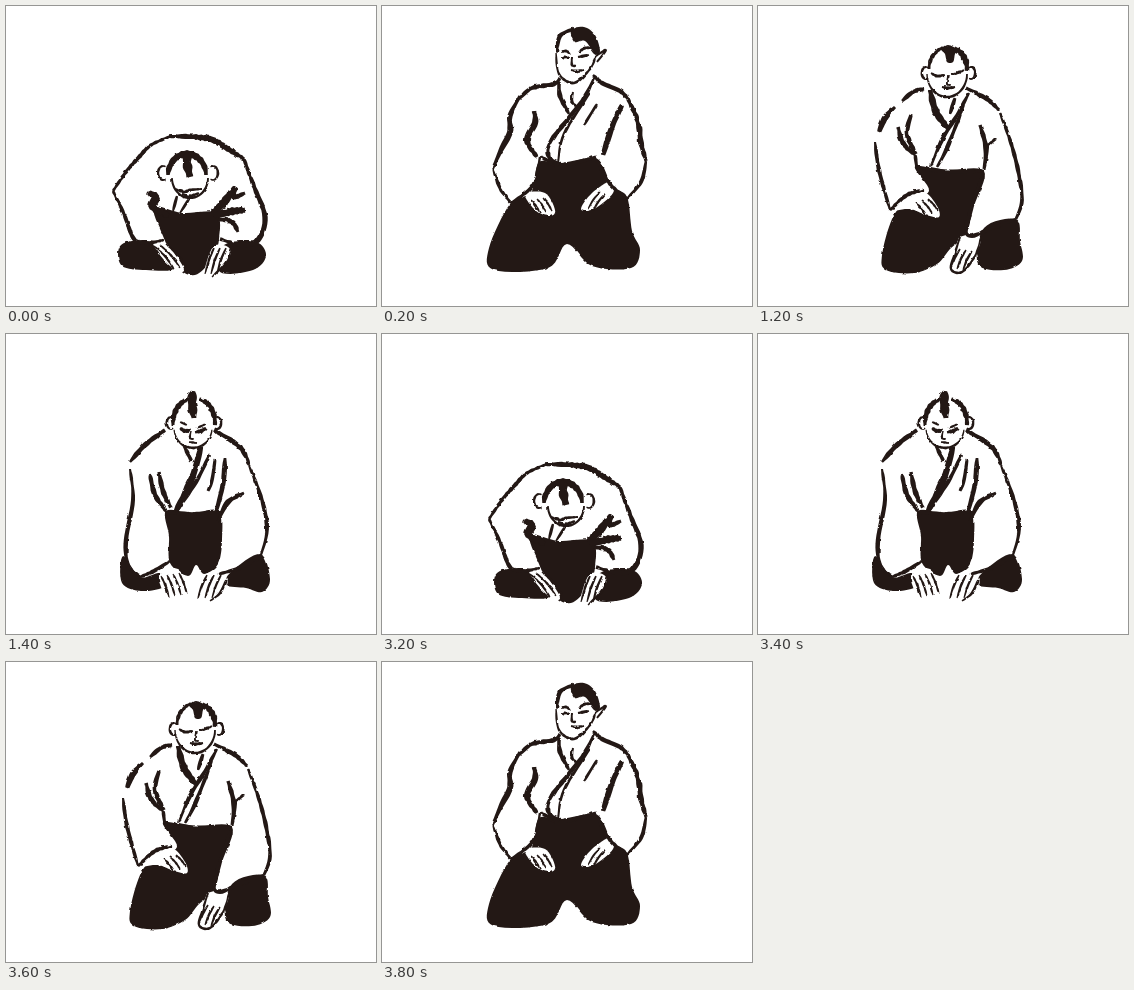
An HTML page that plays this animation: 370x300 px, repeating every 4 s.

```html
<!DOCTYPE html>
<html lang="en">
<head>
<meta charset="utf-8">
<title>Bow</title>
<style>
html, body { margin: 0; width: 100%; height: 100%; overflow: hidden; background: #fff; }
svg { display: block; width: 370px; height: 300px; }
g { visibility: hidden; animation: 4s step-end infinite; }
#sit { animation-name: sit; }
#nod { animation-name: nod; }
#lean { animation-name: lean; }
#low { animation-name: low; }
#bow { animation-name: bow; }
@keyframes sit { 0%, 30% { visibility: hidden } 5%, 95%, 100% { visibility: visible } }
@keyframes nod { 0%, 35%, 95%, 100% { visibility: hidden } 30%, 90% { visibility: visible } }
@keyframes lean { 0%, 40%, 90%, 100% { visibility: hidden } 35%, 85% { visibility: visible } }
@keyframes low { 0%, 40%, 80% { visibility: visible } 5%, 45%, 85%, 100% { visibility: hidden } }
@keyframes bow { 0%, 80%, 100% { visibility: hidden } 45% { visibility: visible } }
</style>
</head>
<body>
<svg viewBox="0 0 370 300">
  <defs>
    <filter id="rough" filterUnits="userSpaceOnUse" x="0" y="0" width="370" height="300" color-interpolation-filters="sRGB">
      <feTurbulence type="fractalNoise" baseFrequency=".16" numOctaves="2" seed="4"/>
      <feDisplacementMap in="SourceGraphic" scale="2.6" xChannelSelector="R" yChannelSelector="G"/>
    </filter>
  </defs>
  <g id="sit" filter="url(#rough)"></g>
  <g id="nod" filter="url(#rough)"></g>
  <g id="lean" filter="url(#rough)"></g>
  <g id="low" filter="url(#rough)"></g>
  <g id="bow" filter="url(#rough)"></g>
</svg>
<script>
const INK = '#231815', PAPER = '#fff';
let layer;

const pose = id => { layer = document.getElementById(id); };
const parse = s => s.split(' ').map(p => p.split(',').map(Number));

function add(pts, color) {
  const path = document.createElementNS('http://www.w3.org/2000/svg', 'path');
  path.setAttribute('d', 'M' + pts.map(p => p.map(v => v.toFixed(1))).join('L') + 'Z');
  path.setAttribute('fill', color);
  layer.append(path);
}

// Catmull-Rom curve through the key points
function spline(pts, closed) {
  const n = pts.length, out = [], steps = 8;
  const at = i => closed ? pts[(i + n) % n] : pts[Math.max(0, Math.min(n - 1, i))];
  for (let i = 0; i < (closed ? n : n - 1); i++) {
    const [a, b, c, d] = [-1, 0, 1, 2].map(k => at(i + k));
    for (let s = 0; s < steps; s++) {
      const t = s / steps;
      out.push(b.map((v, k) => v + .5 * t * (c[k] - a[k] + t * (2 * a[k] - 5 * v + 4 * c[k] - d[k]
        + t * (3 * (v - c[k]) + d[k] - a[k])))));
    }
  }
  if (!closed) out.push(pts[n - 1]);
  return out;
}

const blob = (s, color = INK) => add(spline(parse(s), true), color);

// A stroke that swells in the middle, with a slight uneven pressure
function stroke(w, pts) {
  const left = [], right = [], last = pts.length - 1;
  pts.forEach(([x, y], i) => {
    const a = pts[Math.max(0, i - 1)], b = pts[Math.min(last, i + 1)];
    const dx = b[0] - a[0], dy = b[1] - a[1];
    const press = .6 + .4 * Math.sin(Math.PI * i / last) + .12 * Math.sin(i * .8 + x);
    const k = w * press / 2 / (Math.hypot(dx, dy) || 1);
    left.push([x - dy * k, y + dx * k]);
    right.unshift([x + dy * k, y - dx * k]);
  });
  add([...left, ...right], INK);
}
const brush = (w, ...lines) => lines.forEach(s => stroke(w, spline(parse(s))));

// Part of an ellipse; degrees run clockwise from the right
function arc(w, cx, cy, rx, ry, from, to) {
  stroke(w, Array.from({ length: 25 }, (_, i) => {
    const a = (from + (to - from) * i / 24) * Math.PI / 180;
    return [cx + rx * Math.cos(a), cy + ry * Math.sin(a)];
  }));
}

// Parallel finger lines, each shifted by (sx, sy)
function fingers(x, y, dx, dy, sx, sy, n = 3) {
  for (let i = 0; i < n; i++) {
    const px = x + i * sx, py = y + i * sy;
    stroke(2.2, spline([[px, py], [px + dx * .55, py + dy * .45], [px + dx, py + dy]]));
  }
}

function ears(left, right, y, size) {
  arc(2.5, left, y, size * .7, size, 60, 300);
  arc(2.5, right, y, size * .7, size, 240, 480);
}

// Upright
pose('sit');
blob('157,156 178,159 214,152 230,180 245,191 250,225 258,244 249,262 210,260 185,238 166,262 112,264 107,242 128,198 149,186');
blob('143,188 163,187 173,204 168,210 154,205', PAPER);
blob('229,175 210,187 199,203 212,203 231,187', PAPER);
fingers(149, 194, 9, 13, 6, -1);
fingers(218, 186, -12, 17, 5, 2, 2);
blob('189,24 202,21 213,29 218,45 213,48 203,35 193,36');
brush(4, '191,23 178,30 175,46');
brush(2.6, '174,46 177,68 192,77 208,63 214,50', '214,50 224,44 215,56', '190,51 190,59 194,60', '189,64 195,65 202,64');
brush(3, '179,46 184,45 189,48', '197,46 203,42 209,42', '180,52 188,52', '196,51 207,49');
brush(4.5, '178,72 172,78 150,82 138,92', '211,69 220,77 238,85 247,94', '159,151 180,159 214,151');
brush(5.5, '138,90 128,110 128,126 119,144 111,162', '246,93 256,116 259,137 264,155');
brush(3.5, '111,162 118,182 129,197', '129,197 151,179 158,151', '264,155 259,176 244,194', '215,155 228,178 245,192');
brush(6, '152,105 153,117 145,134 155,151', '240,99 230,121 221,149');
brush(4.5, '177,76 178,90 187,108', '212,72 200,95 169,135 167,151 178,158');
brush(3, '208,87 182,128 176,157', '191,86 190,96 196,101', '215,98 202,119');

// First nod
pose('nod');
blob('157,160 190,164 226,165 216,200 208,228 192,243 179,258 156,267 128,264 124,249 134,213 148,196 171,185');
blob('226,222 258,213 262,235 264,255 246,264 220,258');
blob('146,190 166,186 179,200 181,211 168,209 152,203 134,204', PAPER);
blob('202,231 222,231 217,250 205,265 194,263 198,245', PAPER);
fingers(158, 197, 10, 12, 6, -2);
fingers(202, 243, -9, 19, 6, 1);
brush(2.5, '202,231 197,247 193,263 204,266 217,250 223,231');
blob('183,43 190,39 200,44 197,48 195,56 189,56 187,48');
arc(4, 190, 63, 19, 22, 180, 255);
arc(6, 190, 63, 19, 22, 290, 365);
arc(2.5, 189, 68, 20, 23, 0, 180);
ears(168, 213, 67, 6);
brush(3, '173,67 179,70 187,69', '193,68 199,67 206,64', '184,81 190,82 197,81');
brush(2, '190,70 189,78 193,79');
brush(4.5, '166,83 155,86 144,95', '208,82 229,93 241,104');
brush(5.5, '137,101 127,112 121,126');
brush(4, '117,136 121,164 132,204', '132,204 149,189 166,184', '242,107 252,134 260,164 264,194 258,213', '258,213 234,222 212,230 209,216 225,167');
brush(5, '153,109 149,128 158,148', '140,121 145,137 157,149', '222,119 228,142 226,163');
brush(3.5, '238,133 230,140 227,152', '157,149 159,163');
brush(7, '172,84 178,106 190,122');
brush(4, '211,87 199,109 184,134 173,160', '206,99 189,142 179,161', '197,92 192,108', '158,160 182,165 226,165');

// Leaning forward
pose('lean');
blob('160,177 186,179 213,177 216,205 212,230 198,240 190,231 182,242 164,229 163,202');
blob('117,222 134,243 154,239 160,252 136,257 116,249');
blob('225,238 254,220 264,245 256,258 240,254 220,251');
blob('154,241 172,236 180,251 176,266 166,265 156,255', PAPER);
blob('199,241 216,238 220,251 202,267 191,264', PAPER);
fingers(155, 242, 8, 21, 6, -1, 4);
fingers(201, 241, -9, 23, 7, 0);
brush(2.5, '220,246 214,259 204,267');
brush(9, '187,57 186,68 188,84');
arc(5.5, 188, 89, 21, 25, 175, 255);
arc(5.5, 188, 89, 21, 25, 285, 365);
arc(2.5, 187, 94, 19, 20, 5, 175);
ears(165, 211, 89, 6);
brush(4, '174,94 179,97 184,96', '189,98 195,97 200,94');
brush(2.2, '185,97 184,104 188,105', '183,108 191,109', '174,88 181,91', '191,94 200,90');
brush(5, '159,96 139,111 124,128', '208,96 234,113 243,131');
brush(4, '124,135 127,166 120,206 122,231 134,243', '134,243 148,237 164,227', '243,131 256,166 261,196 255,221', '255,221 236,233 213,240');
brush(5, '144,141 149,161 160,177', '153,138 157,157 165,174', '219,124 217,150 210,178', '238,159 222,168 212,187');
brush(7, '195,113 186,144 169,179');
brush(4, '204,120 190,148 170,178', '209,126 206,146 202,157', '178,112 186,128', '159,178 186,180 213,178');

// Low, hands on the floor
pose('low');
blob('113,242 126,235 155,237 169,262 140,264 116,260');
blob('218,239 250,236 260,250 247,264 214,266');
blob('148,201 176,207 210,207 213,233 206,253 189,269 172,261 157,230');
blob('147,237 158,236 168,247 178,263 170,264 158,254', PAPER);
blob('207,241 222,241 223,252 206,270 198,268', PAPER);
fingers(148, 240, 20, 23, 6, -1);
fingers(208, 242, -9, 26, 6, 0);
brush(2.5, '224,243 221,255 206,271');
brush(4, '107,185 120,166 134,150 145,139 165,130', '107,185 118,208 128,233 142,237 157,234');
brush(6, '163,130 190,131 207,134 222,143 238,153');
brush(5, '238,153 247,178 259,211 252,234 236,239 214,233');
brush(8, '142,187 150,191 147,201 163,210', '206,208 218,196 230,181', '208,210 222,206 239,204');
brush(5, '212,213 226,216 232,226', '230,181 228,191 239,187');
arc(7, 181, 169, 19, 21, 180, 360);
arc(2.5, 184, 172, 18, 20, 0, 180);
brush(9, '182,148 181,157 184,171');
ears(157, 207, 167, 7);
brush(3, '169,183 178,186 184,184 196,183', '176,188 184,190 193,187', '171,190 167,205', '183,193 174,207');

// Full bow
pose('bow');
brush(5.5, '131,192 133,173 148,161 169,152 190,152 210,164 234,191');
brush(4.5, '158,180 138,187 114,210 99,230 97,245 111,260 149,258', '209,181 223,185 236,197');
brush(5, '232,191 249,213 267,234 270,249 254,262 229,268');
brush(6, '148,203 152,223 162,240 170,253', '134,223 150,231 163,246', '229,213 213,230 207,252', '224,221 218,236 229,249');
brush(7, '154,235 157,248 171,259', '211,238 225,237 244,236');
brush(4, '208,246 224,246 242,248', '204,253 215,251 227,257', '146,256 163,252', '139,242 160,241');
arc(10, 185, 226, 20, 21, 160, 380);
arc(3, 184, 230, 20, 19, 0, 180);
brush(5, '184,208 184,222 187,236');
arc(2, 162, 233, 3, 6, 60, 300);
arc(2, 206, 233, 3, 6, 240, 480);
brush(3.5, '152,259 147,265 166,273 188,280', '215,256 201,268 202,277');
fingers(156, 260, 35, 13, 6, 5);
fingers(216, 259, -11, 17, 5, 4, 2);
brush(3, '213,257 230,267 209,280');
</script>
</body>
</html>
```
